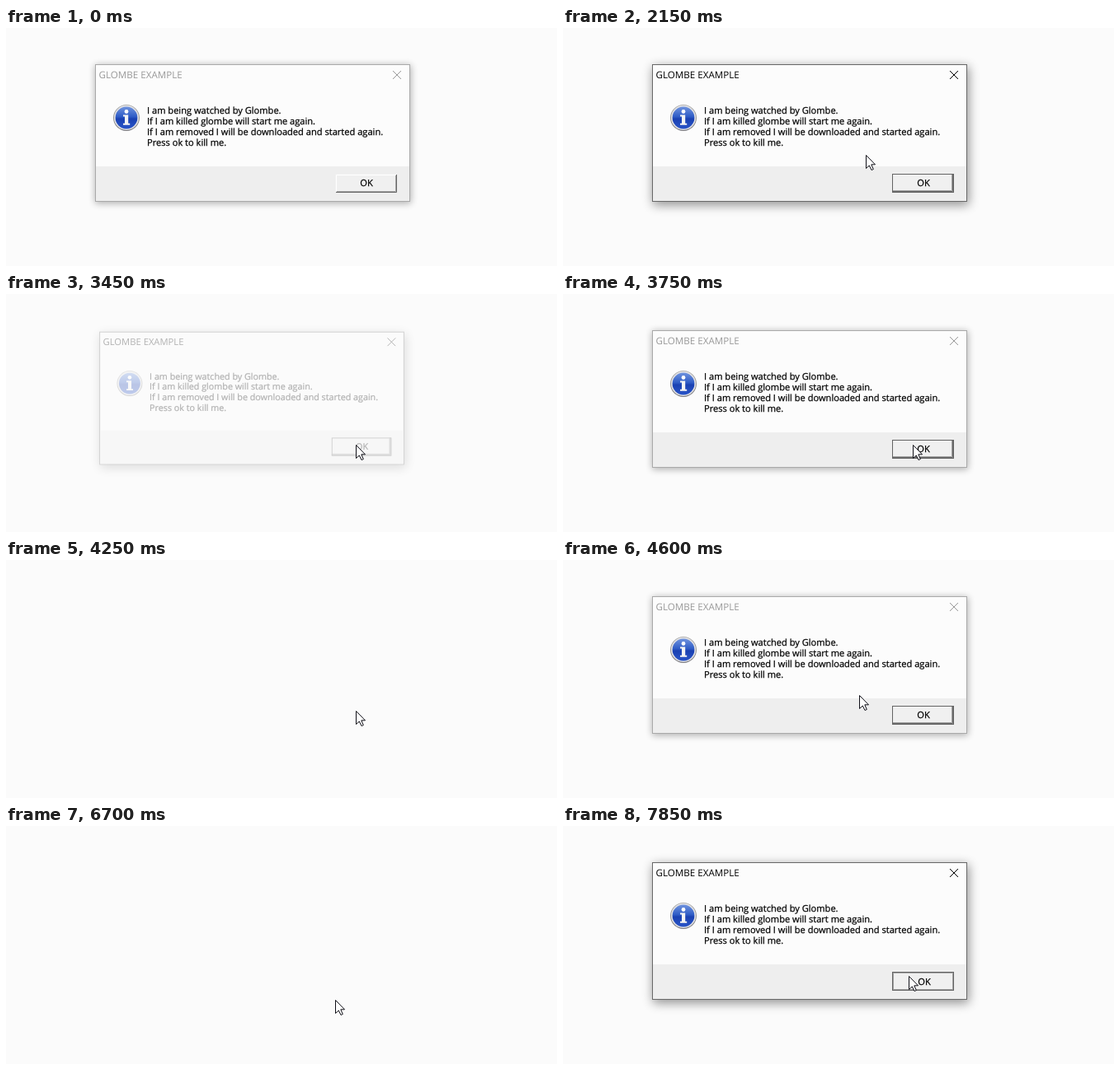
Recreate the animation shown at these times as an HTML page. Size 668 by 289 pixels, loop 8000 ms.

```html
<!DOCTYPE html>
<html lang="en">
<head>
<meta charset="utf-8">
<style>
html, body { margin: 0; width: 100%; height: 100%; overflow: hidden; background: #fbfbfb; }
svg { display: block; width: 668px; height: 289px; }
text { font: 11.1px "Open Sans", "Noto Sans", sans-serif; text-rendering: geometricPrecision; }
.body { stroke: #000; stroke-width: .25; }
.title { font-size: 11.6px; fill: #999; }
.close { stroke: #999; fill: none; }
.frame { fill: #fcfcfc; stroke: #a9a9a9; }
.shadow { opacity: .3; filter: blur(4.5px); }
.active .title { fill: #000; }
.active .close { stroke: #000; }
.active .frame { stroke: #686868; }
.active .shadow { opacity: .42; filter: blur(6.5px); transform: translate(1px, 2px); }
.ring, .sunk { fill: none; visibility: hidden; }
.ring { stroke: #646464; }
.sunk { stroke: #a0a0a0; }
.focus .ring, .pressed .sunk { visibility: visible; }
.focus .bevel { transform: translate(-1px, -1px); }
.pressed .bevel { visibility: hidden; }
.pressed .label { transform: translate(1px, 1px); }
.closing :is(.shadow, .footer, .close) { display: none; }
</style>
</head>
<body>
<svg viewBox="0 0 668 289">
  <defs>
    <linearGradient id="blue" x1="0" y1="0" x2="0" y2="1">
      <stop offset="0" stop-color="#6f93de"/>
      <stop offset=".45" stop-color="#2f5cc6"/>
      <stop offset=".55" stop-color="#1a41b2"/>
      <stop offset="1" stop-color="#2a55c8"/>
    </linearGradient>
    <linearGradient id="rim" x1="0" y1="0" x2="0" y2="1">
      <stop offset="0" stop-color="#b4b4b4"/>
      <stop offset="1" stop-color="#77777c"/>
    </linearGradient>
  </defs>
  <g id="dialog">
    <rect class="shadow" x="108" y="45" width="383" height="168"/>
    <rect class="frame" x="108.5" y="44.5" width="381" height="166"/>
    <rect class="footer" x="109" y="168" width="380" height="42" fill="#eee"/>
    <text class="title" x="112.6" y="61">GLOMBE EXAMPLE</text>
    <path class="close" d="M469 52l10 10m0-10l-10 10"/>
    <circle cx="146" cy="109" r="16" fill="url(#rim)"/>
    <circle cx="146" cy="109" r="15" fill="#e4e4e6"/>
    <circle cx="146" cy="109" r="13.4" fill="url(#blue)"/>
    <circle cx="146" cy="101.5" r="2.4" fill="#fff"/>
    <path d="M142 105.5h6.2v10.3h2v2h-8.2v-2h2v-8.3h-2z" fill="#f4f4f4"/>
    <g class="body">
      <text x="171" y="104">I am being watched by Glombe.</text>
      <text x="171" y="117">If I am killed glombe will start me again.</text>
      <text x="171" y="130">If I am removed I will be downloaded and started again.</text>
      <text x="171" y="143">Press ok to kill me.</text>
    </g>
    <rect class="footer" x="399" y="177" width="75" height="23" fill="#f0f0f0"/>
    <g class="bevel" fill="none">
      <path d="M400.5 198V178.5H472" stroke="#fff"/>
      <path d="M401 198.5H472.5V179" stroke="#a0a0a0"/>
      <path d="M400 199.5H473.5V178" stroke="#696969"/>
    </g>
    <rect class="ring" x="399.5" y="177.5" width="74" height="22"/>
    <rect class="sunk" x="400.5" y="178.5" width="72" height="20"/>
    <text class="body label" x="437" y="192" text-anchor="middle">OK</text>
  </g>
  <path id="cursor" d="M.5.5V16.5L4.3 13L7 18.5L9.3 17.5L6.8 11.8H11.5Z" fill="#fff" stroke="#101018"/>
</svg>
<script>
const LOOP = 8000, STEP = 50, OFF = 400;
const dialog = document.getElementById('dialog');
const cursor = document.getElementById('cursor');

// The pointer rests between moves; a move without duration is a jump.
const moves = [
  { at: 0, x: 283, y: OFF },
  { at: 400, x: 283, y: 113 },
  { at: 450, x: 114, y: OFF },
  { at: 850, x: 114, y: 3 },
  { at: 1250, time: 250, x: 185, y: 88 },
  { at: 1700, time: 300, x: 347, y: 147 },
  { at: 2100, time: 300, x: 424, y: 183 },
  { at: 4550, time: 300, x: 173, y: 85 },
  { at: 4850, time: 300, x: 278, y: 118 },
  { at: 5300, time: 350, x: 407, y: 187 },
  { at: 6700, x: 399, y: 211 },
  { at: 6750, x: 354, y: OFF },
  { at: 7450, x: 354, y: 261 },
  { at: 7450, time: 250, x: 419, y: 182 }
];

// Each life of the dialog: it grows in, then vanishes.
const lives = [
  { open: -STEP, grow: STEP, close: 2800, vanish: 200 },
  { open: 3350, grow: 350, close: 4100, vanish: 100 },
  { open: 4250, grow: 150, close: 5850, vanish: STEP },
  { open: 7100, grow: STEP, close: LOOP, vanish: STEP }
];

const within = (t, from, to) => t >= from && t < to;
const easeOut = (p, power) => 1 - (1 - p) ** power;
const mix = (a, b, p) => Math.round(a + (b - a) * p);

function pointer(t) {
  let x = 0, y = 0;
  for (const m of moves) {
    if (t < m.at) break;
    const p = m.time ? Math.min(1, (t - m.at) / m.time) : 1;
    x = mix(x, m.x, easeOut(p, 1.65));
    y = mix(y, m.y, easeOut(p, 1.16));
  }
  return `translate(${x} ${y})`;
}

function draw(now) {
  const t = Math.floor(now % LOOP / STEP) * STEP;
  const life = lives.findLast(l => t >= l.open);
  const closing = t >= life.close;
  const alpha = closing
    ? .13 * Math.max(0, 1 - (t - life.close) / life.vanish)
    : Math.min(1, (t - life.open) / life.grow);
  const scale = .955 + .045 * alpha;
  const pressed = within(t, 2600, 2800) || within(t, 4000, 4100) || t >= 7850;
  const opening = t > STEP && t < life.open + life.grow + STEP;
  const active = pressed || opening || within(t, 1500, 2800) || t >= 7150;

  cursor.setAttribute('transform', pointer(t));
  dialog.setAttribute('opacity', alpha);
  dialog.setAttribute('transform', alpha < 1
    ? `translate(298 126.5) scale(${scale}) translate(-299 -127.5)` : '');
  const states = { active, pressed, closing, focus: t >= 1500 };
  for (const name in states) dialog.classList.toggle(name, states[name]);
}

const start = performance.now();
function tick() {
  draw(performance.now() - start);
  requestAnimationFrame(tick);
}
tick();
</script>
</body>
</html>
```
